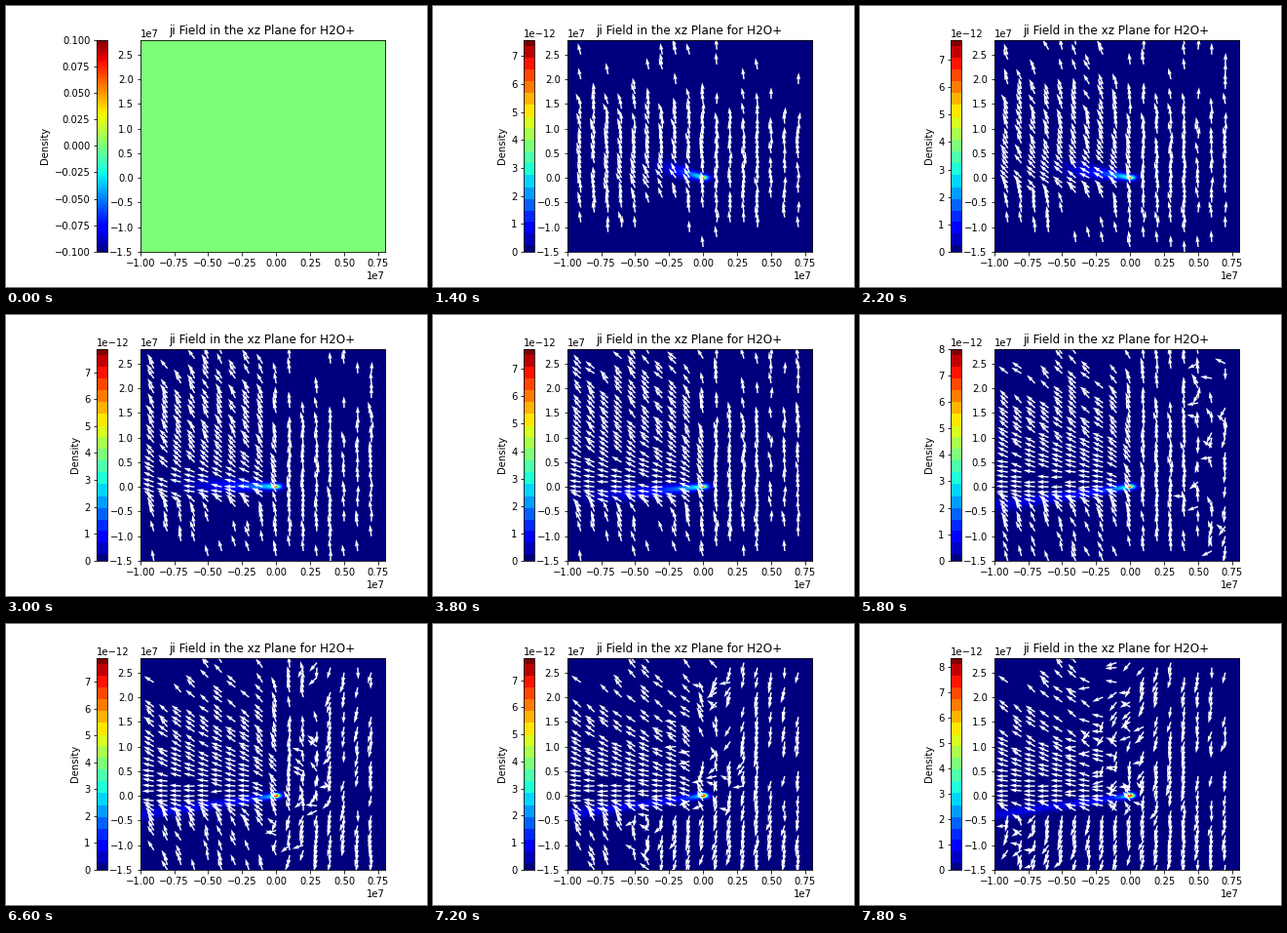
These frames come from a looping animation (432x288 px, 8 s). A matplotlib script:

```python
import numpy as np
import matplotlib.pyplot as plt
from matplotlib.animation import FuncAnimation
from matplotlib.cm import ScalarMappable
from matplotlib.colors import ListedColormap, Normalize

FRAMES, INTERVAL = 40, 200
UNIT = 1e6
PEAK_STEPS = [7, 15, 24, 29, 36, 39]
PEAKS = [7.59, 7.87, 7.56, 8.0, 7.83, 8.38]

rng = np.random.default_rng(12)
X, Y = np.meshgrid(np.arange(-9, 8), np.arange(-15, 28))
seed = rng.uniform(0, 2, X.shape)
drift = rng.uniform(-.05, .05, X.shape)
jitter = rng.normal(0, 1, X.shape)
phase = rng.uniform(0, 2 * np.pi, X.shape)
GX, GY = np.meshgrid(np.linspace(-10, 8, 252), np.linspace(-15, 28, 218))


def ease(s):
    s = np.clip(s, 0, 1)
    return s * s * (3 - 2 * s)


def swell(t):
    """Rise from 0 to 1 and fall back over the loop."""
    return np.sin(np.pi * ease(t / (FRAMES - 1)))


def front(t):
    """Column where the flow turns over; it runs ahead low in the plane."""
    lead = .7 * max(t - 29, 0)
    return 9 - .75 * (t - 25) - np.where(Y < -3, lead, 0)


def visible(t):
    right = X >= np.minimum(0, front(t))
    center = np.where(right, 4 - 6 * ease((t - 29) / 8), 2.5 + 6.5 * swell(t))
    half = np.where(right, 12, 11 + 5 * swell(t))
    floor = np.minimum(.03 + .013 * t, np.where(right, .45, .28))
    cover = floor + (.93 - floor) * np.exp(-((Y - center) / half) ** 4)
    cover = cover * np.where(X > 4, .7, 1)
    cover = cover * np.exp(-(np.hypot(X, Y) / (4 + 3.6 * t)) ** 4)
    chance = np.abs((seed + drift * t) % 2 - 1)
    return chance < cover


def directions(t):
    up = 95 + 42 * ease(t / 24)
    low = 95 + 20 * ease(t / 28)
    tail = 100 + 80 * ease(t / 18)
    right = 93 + .15 * t

    # Arrows lean towards the tail, most of all close to its axis
    depth = np.where(Y >= 0, Y / (1.5 + .2 * t), -Y / 3)
    pull = np.exp(-depth ** 1.5 - ((X + 2) / (1 + .06 * t * t)) ** 2)
    side = np.where(Y >= -3, up, low)
    left = side + (tail - side) * pull
    angle = right + (left - right) * ease((1.5 - X) / 3.5)

    edge = front(t)
    edge = np.where(np.abs(Y + 1) <= 2, np.maximum(edge, .3), edge)
    width = .5 + .06 * np.maximum(Y, 0) * ease((t - 34) / 5)
    turn = 1 / (1 + np.exp(-2 * (X - edge + jitter) / width))
    down = 253 + np.clip(X, 0, 8)
    angle = angle + (down - angle) * turn
    return np.radians(angle + 5 * jitter + 3 * np.sin(phase + .8 * t))


def density(t):
    slope = 1.39 * ease(t / 24) - 1
    near = .8 + 1.2 * swell(t)
    reach = min(.4 * t, 14)
    spread = .03 + .5 * np.exp(-t / 12)
    size = .25 + .12 * ease((t - 28) / 8)

    back = np.maximum(-GX, 0)
    shape = np.exp(-((GY + slope * back) / (.6 + spread * back)) ** 2)
    shape = shape * np.exp(-(np.maximum(GX, 0) / .4) ** 2)
    strength = .36 * np.exp(-back / near) + .1 * np.exp(-(back / reach) ** 4)
    core = np.exp(-((GX + .1) / size) ** 2 - (GY / (1.4 * size)) ** 2)
    return np.maximum(strength * shape, core)


jet = plt.get_cmap("jet")
banded = ListedColormap(jet(np.round(np.linspace(0, 1, 256) * 18) / 18))

fig, ax = plt.subplots(figsize=(6, 4), dpi=72, gridspec_kw={"bottom": .125})
scale = ScalarMappable(Normalize(-.1, .1), jet)
bar = fig.colorbar(scale, ax=ax, location="left")
bar.set_label("Density")
image = ax.imshow(np.zeros(GX.shape), cmap=jet, origin="lower", aspect="auto",
                  extent=(-10 * UNIT, 8 * UNIT, -15 * UNIT, 28 * UNIT))
arrows = ax.quiver(X * UNIT, Y * UNIT, np.ones(X.shape), np.ones(X.shape),
                   color="white", scale=21, width=.0056)
ax.set_xlim(-10 * UNIT, 8 * UNIT)
ax.set_ylim(-15 * UNIT, 28 * UNIT)
ax.set_title("ji Field in the xz Plane for H2O+")


def update(t):
    started = t > 0
    arrows.set_visible(started)
    if started:
        image.set_data(density(t))
        image.set_clim(0, 1)
        scale.set_clim(0, np.interp(t, PEAK_STEPS, PEAKS) * 1e-12)
        scale.set_cmap(banded)
        angle, shown = directions(t), visible(t)
        arrows.set_UVC(np.where(shown, np.cos(angle), np.nan),
                       np.where(shown, np.sin(angle), np.nan))
    else:
        image.set_data(np.zeros(GX.shape))
        image.set_clim(-1, 1)
        scale.set_clim(-.1, .1)
        scale.set_cmap(jet)
    return image, arrows


anim = FuncAnimation(fig, update, frames=FRAMES, interval=INTERVAL,
                     init_func=lambda: update(0), repeat=True, repeat_delay=0,
                     blit=False)
plt.show()
```
